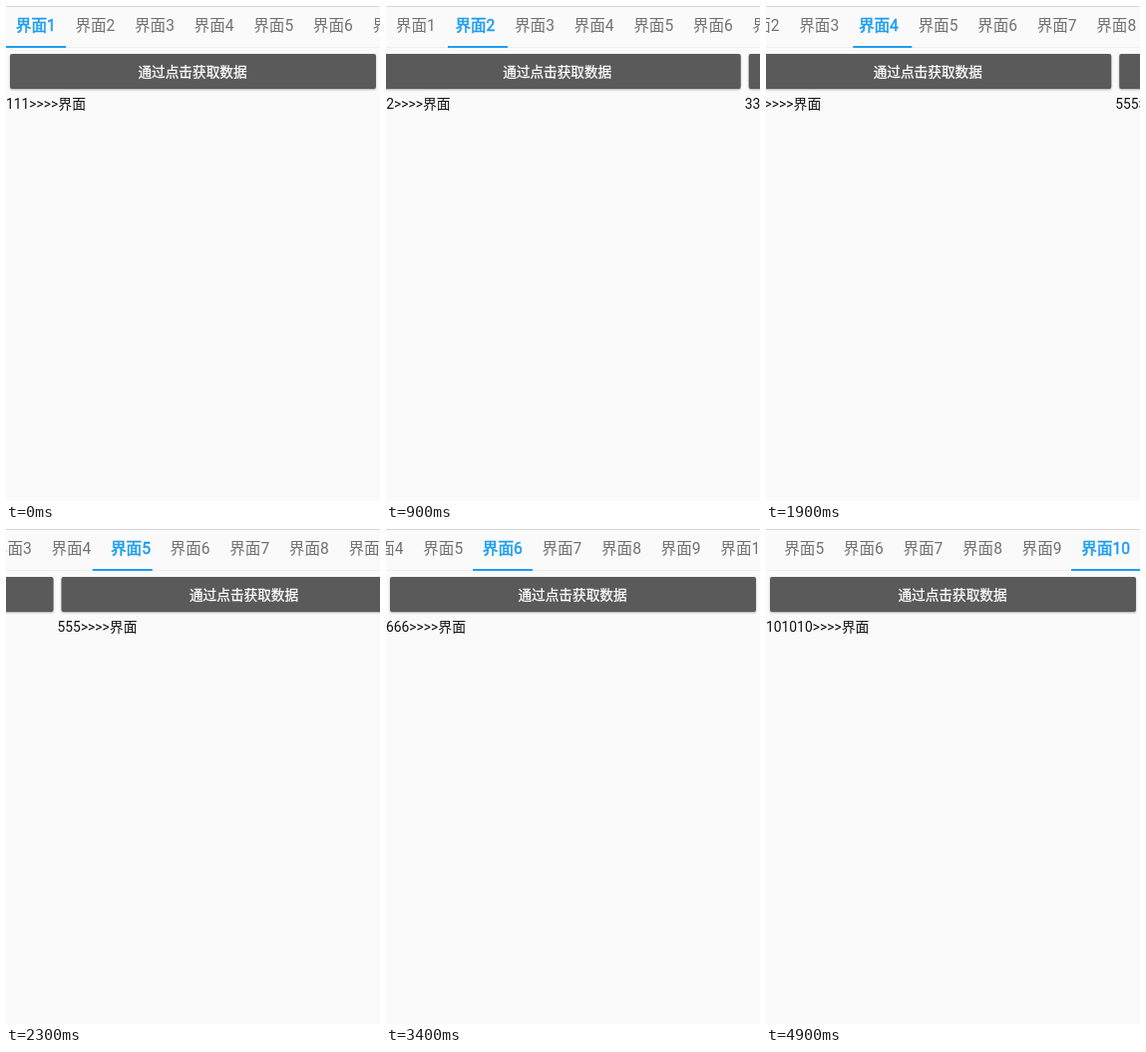
Animation of 375x496 px, one loop 5800 ms. Source, as an HTML page:

```html
<!DOCTYPE html>
<html lang="zh-CN">
<head>
<meta charset="utf-8">
<style>
  html, body { margin: 0; width: 100%; height: 100%; overflow: hidden; background: #fafafa; }
  body { position: relative; font-family: Roboto, "Noto Sans CJK SC", "Noto Sans CJK", sans-serif; }
  #bar { position: absolute; left: 0; top: 0; width: 100%; height: 42px; box-sizing: border-box;
    border-top: 1px solid #d6d6d6; border-bottom: 1px solid #eee; }
  #strip, #pages { position: absolute; left: 0; top: 0; }
  .tab { position: absolute; top: 1px; height: 37px; line-height: 37px; text-align: center;
    font-size: 15.6px; color: #717171; white-space: nowrap; }
  .tab.on { color: #1e9eee; -webkit-text-stroke: .55px; }
  #line { position: absolute; top: 39px; height: 2px; background: #1e9eee; }
  .page { position: absolute; top: 0; width: 375px; white-space: nowrap; }
  .button { position: absolute; left: 3.5px; top: 48px; width: 367px; height: 35px; line-height: 36px;
    border-radius: 2px; background: #5a5a5a; box-shadow: 0 1px 2px rgba(0,0,0,.3);
    color: #fff; font-size: 13.65px; -webkit-text-stroke: .3px; text-align: center; }
  .label { position: absolute; left: 0; top: 88px; line-height: 21px; font-size: 13.85px; color: #111; }
</style>
</head>
<body>
<div id="pages"></div>
<div id="bar"><div id="strip"><div id="line"></div></div></div>
<script>
const COUNT = 10, WIDTH = 375, TAB = 59.6, LAST_TAB = 68.6, LOOP = 5800;
const MAX_SCROLL = TAB * (COUNT - 1) + LAST_TAB - WIDTH, SCROLL_MARGIN = 87;
// Swipe i runs from SWIPES[i] to SWIPES[i + 1]
const SWIPES = [455, 870, 1348, 1825, 2743, 3400, 4000];
const JUMP = { start: 4480, length: 400, from: 6, to: 9 };

const $ = id => document.getElementById(id);
const strip = $('strip'), line = $('line'), pages = $('pages');
const tabWidth = i => i < COUNT - 1 ? TAB : LAST_TAB;

function add(parent, className, text = '') {
  const el = document.createElement('div');
  el.className = className;
  el.textContent = text;
  return parent.appendChild(el);
}

const tabs = Array.from({ length: COUNT }, (_, i) => {
  const n = i + 1;
  const tab = add(strip, 'tab', '界面' + n);
  tab.style.left = i * TAB + 'px';
  tab.style.width = tabWidth(i) + 'px';
  const page = add(pages, 'page');
  page.style.left = i * WIDTH + 'px';
  add(page, 'button', '通过点击获取数据');
  add(page, 'label', String(n).repeat(3) + '>>>>界面');
  return tab;
});

function swipeEase(u) {
  const v = 1 - (1 - u) ** 2;
  return v * v * (3 - 2 * v);
}

function stateAt(t) {
  if (t < SWIPES[0]) return { pos: 0, selected: 0 };
  if (t >= JUMP.start) {
    const u = Math.min(1, (t - JUMP.start) / JUMP.length);
    const eased = 1 - (1 - u) ** 5;
    return { pos: JUMP.from + (JUMP.to - JUMP.from) * eased, selected: JUMP.to };
  }
  const i = SWIPES.findLastIndex(s => t >= s);
  if (i === SWIPES.length - 1) return { pos: i, selected: i };
  const part = swipeEase((t - SWIPES[i]) / (SWIPES[i + 1] - SWIPES[i]));
  return { pos: i + part, selected: part > 0.3 ? i + 1 : i };
}

function draw(now) {
  // The picture advances in 100 ms steps
  const t = Math.floor((now % LOOP) / 100) * 100;
  const { pos, selected } = stateAt(t);
  const left = pos * TAB;
  const scroll = Math.min(MAX_SCROLL, Math.max(0, left - SCROLL_MARGIN));
  const i = Math.floor(pos), next = Math.min(i + 1, COUNT - 1);
  strip.style.transform = `translateX(${-scroll}px)`;
  pages.style.transform = `translateX(${-pos * WIDTH}px)`;
  line.style.left = left + 'px';
  line.style.width = tabWidth(i) + (tabWidth(next) - tabWidth(i)) * (pos - i) + 'px';
  tabs.forEach((tab, k) => tab.classList.toggle('on', k === selected));
}

const start = performance.now();
function tick() {
  draw(performance.now() - start);
  requestAnimationFrame(tick);
}
tick();
</script>
</body>
</html>
```
